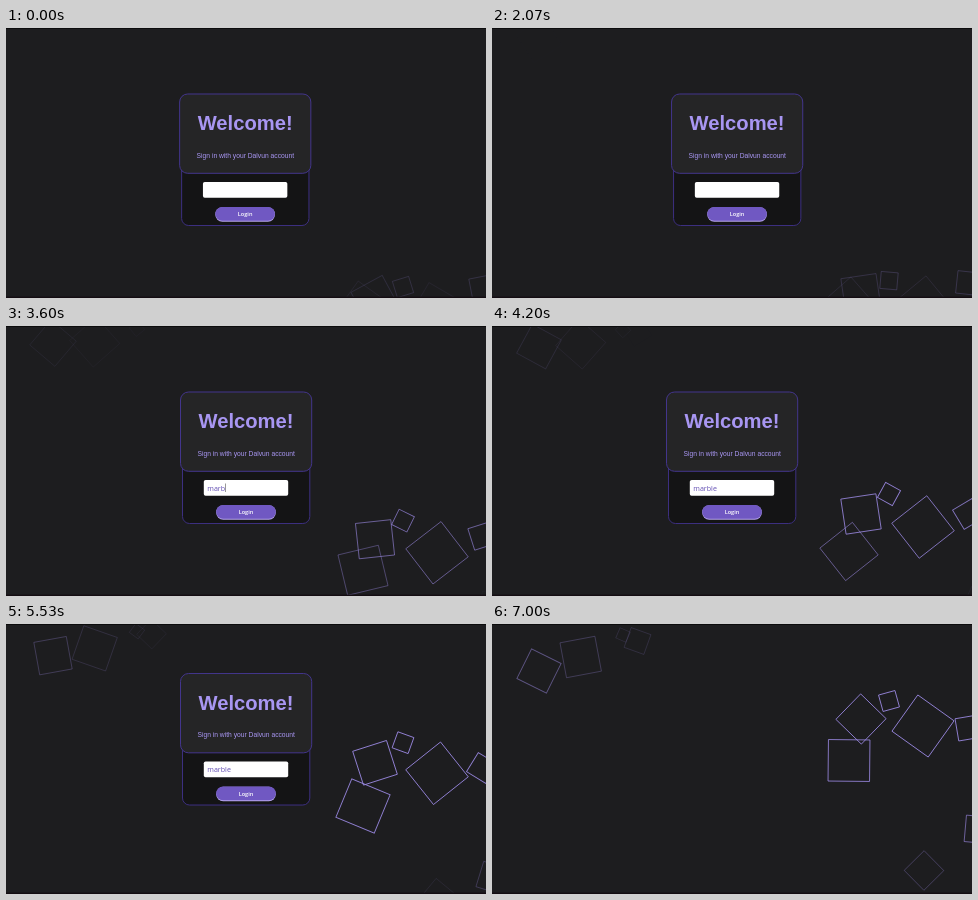
An HTML page that plays this animation: 480 by 270 pixels, repeating every 7070 ms.

```html
<!DOCTYPE html>
<html lang="en">
<head>
<meta charset="utf-8">
<title>Login</title>
<style>
  html, body { margin: 0; width: 100%; height: 100%; overflow: hidden; background: #1d1d1f; }
  svg { display: block; width: 100vw; height: 100vh; }
  text { font-family: "Liberation Sans", Arial, sans-serif; text-anchor: middle; fill: #a896f2; }
  .ui { font-family: "Open Sans", "Noto Sans", sans-serif; }
  #squares rect { fill: none; stroke: #9d8be6; stroke-width: 0.9; }
</style>
</head>
<body>
<svg viewBox="0 0 480 270">
  <rect width="480" height="270" fill="#1d1d1f"/>
  <g id="squares"></g>
  <g id="card">
    <rect x="176.5" y="130.5" width="127.3" height="67" rx="7" fill="#141415" stroke="#3c2f80"/>
    <rect x="174.5" y="66" width="131.2" height="79.3" rx="8" fill="#252526" stroke="#43358c"/>
    <text x="240" y="102" font-size="20.2" font-weight="700">Welcome!</text>
    <text x="240.2" y="129.8" font-size="6.72">Sign in with your Dalvun account</text>
    <rect x="197.8" y="154" width="84.4" height="15.8" rx="1.8" fill="#fff"/>
    <text id="entry" class="ui" x="201.3" y="164.8" font-size="7.1" style="text-anchor:start;fill:#6450b4"></text>
    <rect id="caret" y="157.5" width="0.6" height="8.5" fill="#555"/>
    <rect x="210.2" y="179.3" width="59.6" height="14.4" rx="7" fill="#b6a5ec"/>
    <rect x="210.2" y="179" width="59.6" height="13.7" rx="6.9" fill="#7058c2"/>
    <text class="ui" x="240" y="188" font-size="5.6" font-weight="600" style="fill:#fff">Login</text>
  </g>
  <rect width="480" height="1" fill="#0c0c0d"/>
  <rect y="268.6" width="480" height="1.4" fill="#140d12"/>
</svg>
<script>
const LOOP = 7070, STEP = 1000 / 15;
const FREEZE_END = 1865, BEGIN = 1800, MIDDLE = 4200, END = 7000;
const FLOOR = 271.5, TRAVEL = 276.6, TURN = 960;
const SHAKE = { start: 1787, period: 345, count: 2, reach: 8 };
const EXIT = { start: 4900, length: 1200, drop: 215 };
const TYPING = { word: "marble", focus: 2640, start: 3100, gap: 130, end: 3950 };

// Each square drifts through three heights; spin and fade follow from the height
const SQUARES = [
  { x: 397, size: 17, path: [259, 168, 77] },
  { x: 431, size: 44.5, path: [285, 201, 102] },
  { x: 357, size: 41.5, path: [282, 225.5, 136.5] },
  { x: 369, size: 35.5, path: [271.5, 188, 95] },
  { x: 476, size: 22.5, path: [260, 188, 104] },
  { x: 486.5, size: 26.5, path: [284.7, 278, 205.5] },
  { x: 432, size: 28, path: [285.5, 285.3, 246.5] },
  { x: 47, size: 33, path: [11.5, 20.5, 47] },
  { x: 88.7, size: 35.5, path: [12.7, 18, 33] },
  { x: 145.5, size: 21, path: [4, 6, 17] },
  { x: 131, size: 11, path: [0.5, 4, 11] }
];

const byId = id => document.getElementById(id);
const clamp = v => Math.max(0, Math.min(1, v));
const card = byId("card"), entry = byId("entry"), caret = byId("caret");

for (const square of SQUARES) {
  const el = document.createElementNS("http://www.w3.org/2000/svg", "rect");
  const { size } = square;
  const box = { x: -size / 2, y: -size / 2, width: size, height: size };
  for (const name in box) el.setAttribute(name, box[name]);
  byId("squares").append(el);
  square.el = el;
}

function hermite(from, to, slopeFrom, slopeTo, span, u) {
  const v = 1 - u;
  return v * v * (1 + 2 * u) * from + u * u * (3 - 2 * u) * to
    + span * u * v * (v * slopeFrom - u * slopeTo);
}

// Slow start, fastest around the middle
function heightAt([first, middle, last], t) {
  const spanA = MIDDLE - BEGIN, spanB = END - MIDDLE;
  const a = (middle - first) / spanA, b = (last - middle) / spanB;
  const peak = 1.25 * 2 * a * b / (a + b);
  return t < MIDDLE
    ? hermite(first, middle, 0.55 * a, peak, spanA, (t - BEGIN) / spanA)
    : hermite(middle, last, peak, 1.5 * b - 0.5 * peak, spanB, (t - MIDDLE) / spanB);
}

function shakeAt(t) {
  const turns = (t - SHAKE.start) / SHAKE.period;
  if (turns < 0 || turns > SHAKE.count) return 0;
  const p = turns % 1;
  const wave = p < 0.35 ? -p / 0.35 : p < 0.7 ? (p - 0.525) / 0.175 : (1 - p) / 0.3;
  return wave * SHAKE.reach;
}

function exitAt(t) {
  const p = clamp((t - EXIT.start) / EXIT.length);
  return EXIT.drop * p * p * (2.7 * p - 1.7);
}

function draw(t) {
  for (const { el, x, size, path } of SQUARES) {
    const y = heightAt(path, t), part = (FLOOR + size / 2 - y) / TRAVEL;
    el.setAttribute("transform", `translate(${x} ${y}) rotate(${part * TURN})`);
    el.setAttribute("opacity", 0.9 * clamp(Math.min(2.6 * part, 4.4 * (1 - part))));
  }
  card.setAttribute("transform", `translate(${shakeAt(t)} ${exitAt(t)})`);
  card.style.display = t < EXIT.start + EXIT.length ? "" : "none";

  const typed = Math.max(0, Math.floor((t - TYPING.start) / TYPING.gap) + 1);
  entry.textContent = TYPING.word.slice(0, typed);
  caret.setAttribute("x", 201.2 + (typed ? entry.getComputedTextLength() + 0.4 : 0));
  caret.style.display = t >= TYPING.focus && t < TYPING.end ? "" : "none";
}

const begin = performance.now();
function tick() {
  const now = (performance.now() - begin) % LOOP;
  const t = Math.floor((now + 4) / STEP) * STEP;
  draw(t < FREEZE_END ? BEGIN : t);
  requestAnimationFrame(tick);
}
tick();
</script>
</body>
</html>
```
